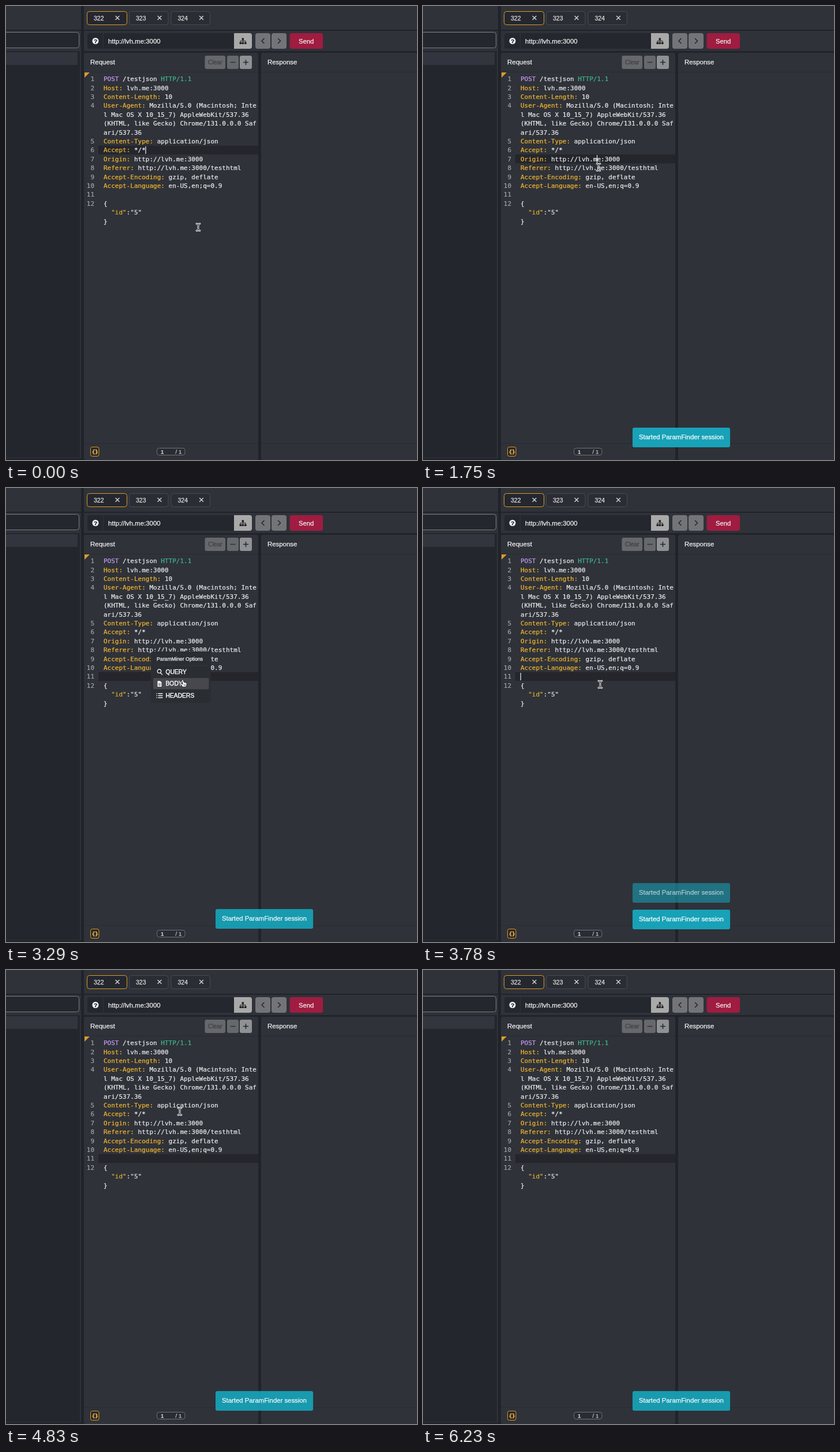
These frames come from a looping animation (712x786 px, 6.3 s). An HTML page with a canvas:

```html
<!DOCTYPE html>
<html lang="en">
<head>
<meta charset="utf-8">
<title>Request editor</title>
<style>
html, body { margin: 0; width: 100%; height: 100%; overflow: hidden; background: #202329; }
canvas { display: block; }
</style>
</head>
<body>
<canvas id="stage" width="712" height="786"></canvas>
<script>
const ctx = document.getElementById('stage').getContext('2d');
const LOOP = 6300, STEP = 70;
const SANS = '"Liberation Sans", Arial, sans-serif';
const MONO = '"DejaVu Sans Mono", monospace';
const PANEL = '#2f3239', DARK = '#25272e', GAP = '#202329', ORANGE = '#dc9a26';
const KEY = '#f3b72f', PLAIN = '#ececec', CHAR = 6.62, LINE = 15.4;

const clamp = v => Math.max(0, Math.min(1, v));

function box(x, y, w, h, fill, radius = 0, border) {
  ctx.beginPath();
  ctx.roundRect(x, y, w, h, radius);
  if (fill) { ctx.fillStyle = fill; ctx.fill(); }
  if (border) { ctx.strokeStyle = border; ctx.lineWidth = 1; ctx.stroke(); }
}

function text(str, x, y, size = 11.35, color = '#f2f2f2', family = SANS, weight = 0.25) {
  ctx.font = `${size}px ${family}`;
  ctx.fillStyle = ctx.strokeStyle = color;
  ctx.fillText(str, x, y);
  ctx.lineWidth = weight;
  ctx.strokeText(str, x, y);
}

function path(d, color, width, x = 0, y = 0, fill) {
  ctx.save();
  ctx.translate(x, y);
  const shape = new Path2D(d);
  ctx.lineJoin = ctx.lineCap = 'round';
  if (fill) { ctx.fillStyle = fill; ctx.fill(shape); }
  if (width) { ctx.strokeStyle = color; ctx.lineWidth = width; ctx.stroke(shape); }
  ctx.restore();
}

// Each row: line number, then colour/text pairs
const header = (num, line) => {
  const cut = line.indexOf(':') + 1;
  return [num, KEY, line.slice(0, cut), PLAIN, line.slice(cut)];
};
const rows = [
  ['1', '#c39af0', 'POST', PLAIN, ' /testjson', '#40b78d', ' HTTP/1.1'],
  header('2', 'Host: lvh.me:3000'),
  header('3', 'Content-Length: 10'),
  header('4', 'User-Agent: Mozilla/5.0 (Macintosh; Inte'),
  ['', PLAIN, 'l Mac OS X 10_15_7) AppleWebKit/537.36 '],
  ['', PLAIN, '(KHTML, like Gecko) Chrome/131.0.0.0 Saf'],
  ['', PLAIN, 'ari/537.36'],
  header('5', 'Content-Type: application/json'),
  header('6', 'Accept: */*'),
  header('7', 'Origin: http://lvh.me:3000'),
  header('8', 'Referer: http://lvh.me:3000/testhtml'),
  header('9', 'Accept-Encoding: gzip, deflate'),
  header('10', 'Accept-Language: en-US,en;q=0.9'),
  ['11'],
  ['12', PLAIN, '{'],
  ['', '#dcae36', '  "id"', PLAIN, ':', '#dedede', '"5"'],
  ['', PLAIN, '}'],
];

// Time, x, y of the pointer
const moves = [
  [70, 333, 383], [420, 303, 268], [560, 303, 268], [700, 304, 279], [2100, 304, 279],
  [2450, 303, 326], [3010, 303, 326], [3360, 307, 340], [3780, 307, 340],
  [4130, 301, 231], [4270, 301, 231], [4480, 301, 245], [4830, 301, 245], [5040, 298, 251],
];
// Caret placements: time, row, column
const clicks = [[0, 8, 11], [490, 9, 20], [2450, 13, 0]];
// Menus: open time, close time, centre
const menus = [[560, 1120, 303, 268], [2940, 3430, 303, 326], [4200, 4480, 301, 231]];
const toasts = [1610, 3640, 4830];
const TOAST_LIFE = 2090;

function pointerAt(t) {
  const next = moves.findIndex(m => m[0] > t);
  if (next === 0) return moves[0].slice(1);
  if (next < 0) return moves[moves.length - 1].slice(1);
  const [t0, x0, y0] = moves[next - 1], [t1, x1, y1] = moves[next];
  const p = (t - t0) / (t1 - t0), e = p * p * (3 - 2 * p);
  return [x0 + (x1 - x0) * e, y0 + (y1 - y0) * e];
}

function drawChrome() {
  box(0, 0, 712, 786, GAP);
  // Sidebar
  box(0, 0, 130, 41, PANEL);
  box(0, 43, 130, 740, PANEL);
  box(-8, 45.5, 134.5, 27, DARK, 4, '#7b7d82');
  box(0, 78, 128, 704, '#24262d');
  box(0, 80, 124, 22, '#32353d');
  // Main panels
  box(135, 0, 577, 41, PANEL);
  box(135, 43, 577, 35, PANEL);
  box(135, 81, 302, 705, PANEL, 3);
  box(442, 81, 270, 705, PANEL, 3);
  for (const y of [114, 757]) {
    box(135, y, 302, 1, '#282b31');
    box(442, y, 270, 1, '#282b31');
  }
  // Tabs
  [[140.5, 69, '322'], [213.5, 67.5, '323'], [286, 67.5, '324']].forEach(([x, w, name], i) => {
    box(x, 9.5, w, 23, i ? '#2a2d33' : DARK, 4, i ? '#484b52' : ORANGE);
    text(name, x + 11.5, 24.5, 10.5, '#e2e2e2');
    path('M-3 -3L3 3M3 -3L-3 3', '#d8d8d8', 1.4, x + 52.5, 20.5);
  });
  // Address bar
  box(141, 47, 254, 27, DARK, [4, 0, 0, 4]);
  box(168, 47, 1, 27, PANEL);
  path('M-5.5 0A5.5 5.5 0 1 0 5.5 0A5.5 5.5 0 1 0 -5.5 0', '', 0, 155, 60.5, '#f0f0f0');
  text('?', 152.6, 64, 9.5, '#25272e', SANS, 0.7);
  text('http://lvh.me:3000', 177, 64.5, 11.4);
  box(395, 47, 31, 27, '#a9a9a9', [0, 4, 4, 0]);
  path('M0 -2V2M-4.5 2V0H4.5V2', '#222', 1, 410.5, 60.5);
  [[-2, -5], [-6, 2], [-2, 2], [2.5, 2]].forEach(([x, y]) => box(410.5 + x, 60.5 + y, 3.6, 3.4, '#222', 0.5));
  box(432, 47, 26, 27, '#737478', 4);
  box(460, 47, 26, 27, '#737478', 4);
  path('M2 -4L-2 0L2 4', '#24262c', 1.6, 445, 60.5);
  path('M-2 -4L2 0L-2 4', '#24262c', 1.6, 473.5, 60.5);
  box(491.5, 47, 57.5, 27, '#a01c41', 4);
  text('Send', 507, 64.5, 11.2);
  // Panel titles
  text('Request', 146, 100.8, 11.5);
  text('Response', 453, 100.8, 11.4);
  box(344.5, 86, 35.5, 23, '#66686c', 3);
  text('Clear', 350, 101, 10.3, '#3c3f45');
  box(383, 86, 20, 23, '#66686c', 3);
  box(405, 86, 21, 23, '#8f9195', 3);
  path('M-4 0H4', '#303339', 1.4, 393, 97.5);
  path('M-4 0H4M0 -4V4', '#24262c', 1.5, 415.5, 97.5);
  path('M136 115H145L136 124Z', '', 0, 0, 0, '#d99b2c');
  // Footer
  box(146.5, 763.5, 14.5, 16, '#28292d', 3, ORANGE);
  text('{}', 148.8, 774.5, 9, '#e0a33a', MONO, 0);
  box(261.5, 765.5, 48.5, 12, '#292c32', 4, '#70737a');
  text('1', 268, 775, 9.8);
  text('/ 1', 293.5, 775, 9.8, '#c4c5c8');
}

function drawEditor(t) {
  const [since, active, column] = clicks.filter(c => c[0] <= t).pop();
  box(160, 118.5 + active * LINE, 277, LINE, '#24262c');
  rows.forEach(([num, ...parts], i) => {
    const y = 130.2 + i * LINE;
    ctx.textAlign = 'right';
    text(num, 153, y, 11, '#a5a7ac', MONO, 0.15);
    ctx.textAlign = 'left';
    let x = 169;
    for (let k = 0; k < parts.length; k += 2) {
      text(parts[k + 1], x, y, 11, parts[k], MONO, 0.22);
      x += parts[k + 1].length * CHAR;
    }
  });
  if ((t - since) % 1200 < 600 && t < 6020)
    box(168.6 + column * CHAR, 119.7 + active * LINE, 1.2, 13, '#f4f4f4');
}

// Returns whether the pointer is over a menu item
function drawMenu(t, pointerY) {
  const menu = menus.find(m => t >= m[0] && t < m[1] + 140);
  if (!menu) return false;
  const [open, close, cx, cy] = menu;
  const hover = Math.floor((pointerY - cy + 18) / 20.5);
  ctx.save();
  ctx.globalAlpha = Math.min(clamp((t - open + STEP) / 140), clamp(1 - (t - close) / 140));
  ctx.translate(cx - 52, cy - 44);
  box(0, 1, 103.5, 89, '#2a2d32', 4);
  text('ParamMiner Options', 10, 17, 8.75);
  box(4, 24.5, 96, 1, '#34373d');
  ['QUERY', 'BODY', 'HEADERS'].forEach((label, i) => {
    const top = 26 + i * 20.5;
    if (i === hover) box(4, top + 0.5, 96.5, 19.5, '#46484e', 2);
    text(label, 25.5, top + 13.8, 10.3, '#fff', SANS, 0.4);
  });
  path('M3.2 -.8A3.2 3.2 0 1 1 -3.2 -.8A3.2 3.2 0 1 1 3.2 -.8M2 2L5 5', '#f2f2f2', 1.3, 14.5, 36);
  path('M-3.5 -5H1L3.5 -2.5V5H-3.5Z', '', 0, 15, 57, '#f2f2f2');
  path('M-1.5 0H1.5M-1.5 2.3H1.5', '#46484e', 1, 15, 57);
  path('M-5 -3.5H-4.6M-2 -3.5H5M-5 0H-4.6M-2 0H5M-5 3.5H-4.6M-2 3.5H5', '#f2f2f2', 1.3, 15, 77.5);
  ctx.restore();
  return t < close && hover >= 0 && hover < 3;
}

function drawToasts(t) {
  toasts.forEach((start, i) => {
    const age = t - start, fade = 1 - clamp((age - TOAST_LIFE) / 210);
    if (age <= 0 || fade === 0) return;
    const lifted = t > toasts[i + 1];
    const slide = 27 * (1 - clamp(age / 210)) ** 3;
    ctx.save();
    ctx.globalAlpha = clamp(age / 140) * fade * (age > 210 ? 0.93 : 1);
    ctx.translate(363, (lifted ? 684 : 729) + slide);
    box(0, 0, 169, 34, '#17a2b8', 3);
    text('Started ParamFinder session', 11, 20.3, 11.35, '#fff');
    ctx.restore();
  });
}

function drawPointer(x, y, hand) {
  if (hand) {
    path('M-3 -6Q-1.5 -7.5 -.5 -6L.5 -2.5L4 -1.5Q6 -.5 5.5 2L4 6H-1.5L-5 1Q-5 -1 -3 0L-1.5 1Z',
      '#25272c', 0.9, x + 1, y, '#fff');
    path('M1 1.5V4M3 1.5V4', '#25272c', 0.7, x + 1, y);
    return;
  }
  const beam = 'M-3 -6Q0 -6 0 -3.5Q0 -6 3 -6M0 -4V4M-3 6Q0 6 0 3.5Q0 6 3 6';
  path(beam, '#f0f0f0', 2.8, x, y);
  path(beam, '#24262b', 0.9, x, y);
}

function frame() {
  const t = Math.floor(performance.now() % LOOP / STEP) * STEP;
  const [x, y] = pointerAt(t);
  drawChrome();
  drawEditor(t);
  const hand = drawMenu(t, y);
  drawToasts(t);
  if (t < 6230) drawPointer(x, y, hand);
  requestAnimationFrame(frame);
}
frame();
</script>
</body>
</html>
```
